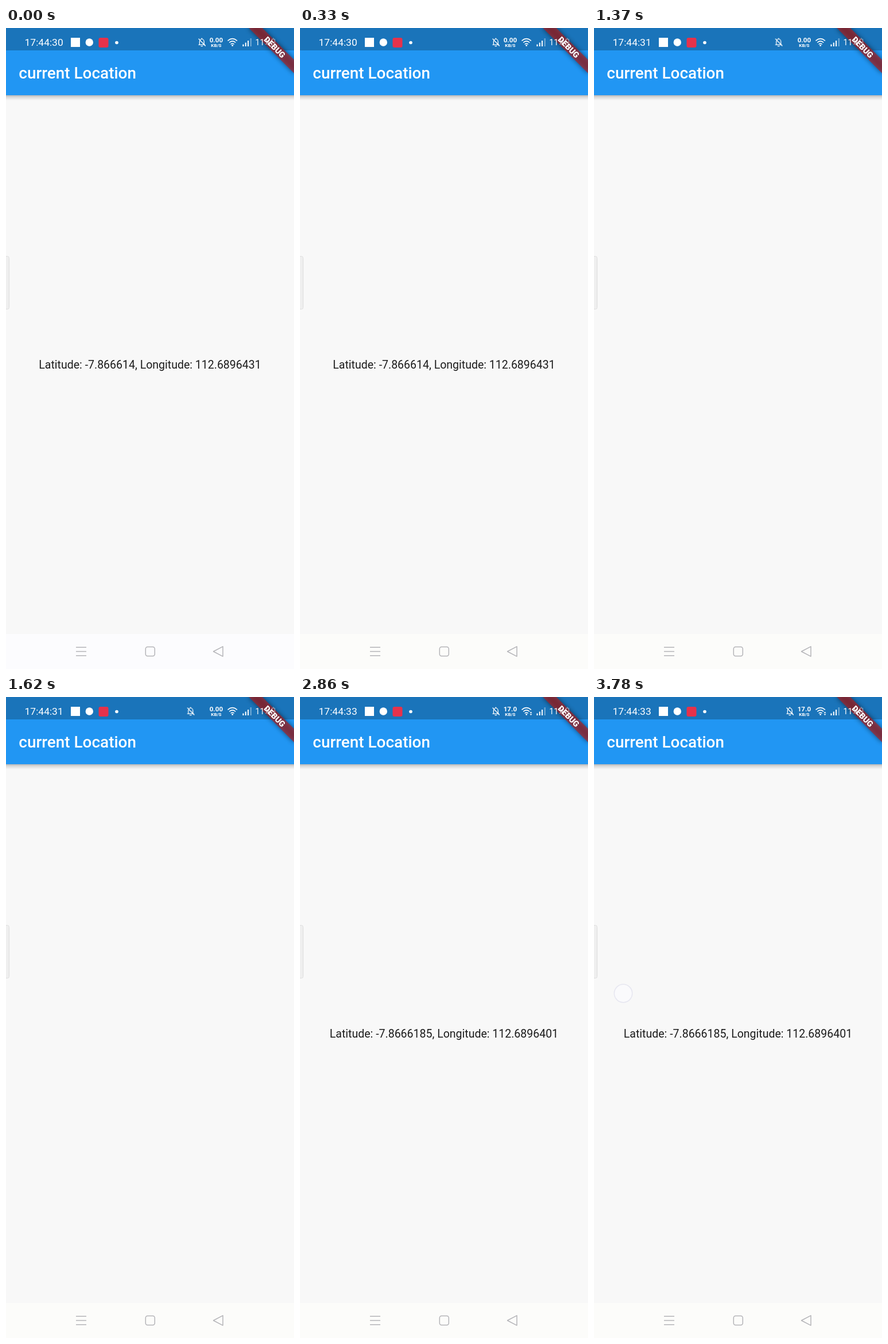
An HTML page that plays this animation: 502 by 1116 pixels, repeating every 3.82 s.

```html
<!DOCTYPE html>
<html lang="en">
<head>
<meta charset="utf-8">
<title>Current location</title>
<style>
  html, body { margin: 0; width: 100%; height: 100%; overflow: hidden; background: #f8f8f8; }
  svg { display: block; width: 502px; height: 1116px; font-family: Roboto, sans-serif; }
  .clock { font-size: 17.4px; }
  .coords { font-size: 19.52px; fill: #1c1c1c; text-anchor: middle; }
  .rate { font-size: 11.6px; font-weight: 700; text-anchor: middle; }

  /* one 3820 ms loop, hard cuts unless noted */
  .cut { opacity: 0; animation: 3820ms step-end infinite; }
  .s0 { animation-name: s0; }
  .s1 { animation-name: s1; }
  .s2 { animation-name: s2; }
  .s3 { animation-name: s3; }
  .fix1 { animation-name: fix1; }
  .fix2 { animation-name: fix2; }
  .idle { animation-name: idle; }
  .busy { animation-name: busy; }
  .cool { animation-name: cool; }
  .touch { animation-name: touch; animation-timing-function: linear; }
  .bell { animation: bell 3820ms ease-in-out infinite; }

  @keyframes s0 { 0% { opacity: 1 } 19.37%, 100% { opacity: 0 } }
  @keyframes s1 { 0% { opacity: 0 } 19.37% { opacity: 1 } 45.5%, 100% { opacity: 0 } }
  @keyframes s2 { 0% { opacity: 0 } 45.5% { opacity: 1 } 72.7%, 100% { opacity: 0 } }
  @keyframes s3 { 0% { opacity: 0 } 72.7%, 100% { opacity: 1 } }
  @keyframes fix1 { 0% { opacity: 1 } 29.3%, 100% { opacity: 0 } }
  @keyframes fix2 { 0% { opacity: 0 } 46.5%, 100% { opacity: 1 } }
  @keyframes idle { 0% { opacity: 1 } 45.5%, 100% { opacity: 0 } }
  @keyframes busy { 0% { opacity: 0 } 45.5%, 100% { opacity: 1 } }
  @keyframes cool { 0% { opacity: 1 } 7.5%, 100% { opacity: 0 } }
  @keyframes touch { 0%, 91.3% { opacity: 0 } 93.4%, 100% { opacity: 1 } }
  @keyframes bell {
    0%, 30.4% { transform: none }
    34.6%, 45.5% { transform: translateX(-19.5px) }
    50%, 100% { transform: none }
  }
</style>
</head>
<body>
<svg viewBox="0 0 502 1116">
  <defs>
    <filter id="soft" x="-30%" y="-150%" width="160%" height="400%"><feGaussianBlur stdDeviation="4"/></filter>
    <linearGradient id="drop" x2="0" y2="1">
      <stop offset="0" stop-opacity=".27"/>
      <stop offset=".35" stop-opacity=".13"/>
      <stop offset="1" stop-opacity="0"/>
    </linearGradient>
  </defs>

  <rect width="502" height="1116" fill="#f8f8f8"/>

  <!-- app bar -->
  <rect y="117" width="502" height="9" fill="url(#drop)"/>
  <rect width="502" height="117" fill="#2196f3"/>
  <rect width="502" height="39" fill="#1a74ba"/>
  <text x="22.3" y="88" font-size="27.9" font-weight="500" fill="#fff">current Location</text>

  <!-- corner banner -->
  <g transform="translate(502 0) rotate(45)">
    <rect x="-55.8" y="39" width="111.5" height="16.7" opacity=".5" filter="url(#soft)"/>
    <rect x="-55.8" y="39" width="111.5" height="16.7" fill="#b71c1c" fill-opacity=".627"/>
    <text y="52.5" font-size="14.2" font-weight="900" fill="#fff" text-anchor="middle">DEBUG</text>
  </g>

  <!-- status bar, above the banner -->
  <g fill="#fff">
    <g class="clock">
      <text class="cut s0" x="32.6" y="31">17:44:30</text>
      <text class="cut s1" x="32.6" y="31">17:44:31</text>
      <text class="cut s2" x="32.6" y="31">17:44:32</text>
      <text class="cut s3" x="32.6" y="31">17:44:33</text>
    </g>
    <rect x="113" y="17" width="16" height="16"/>
    <circle cx="145.3" cy="25" r="6.7"/>
    <rect x="161.5" y="17" width="17" height="17" rx="3" fill="#e6324b"/>
    <circle cx="193" cy="25.5" r="2.8"/>

    <g class="bell" fill="none" stroke="#fff" stroke-width="1.3" stroke-linecap="round" stroke-linejoin="round">
      <path d="M336 29.2h10.6M337.4 28.8v-5a3.9 4.6 0 0 1 7.8 0v5M341.3 18.9v-1M340 31.6h2.6M336 19l11.4 12"/>
    </g>

    <text class="rate cut idle" x="366.4" y="25">0.00</text>
    <text class="rate cut busy" x="366.4" y="25">17.0</text>
    <text x="366.4" y="33.2" font-size="8.1" font-weight="700" text-anchor="middle">KB/S</text>

    <path d="M387 21.8q7.6-6.4 15.4 0M389.7 25q5-4.2 10 0M392.2 28q2.5-2 5 0" fill="none" stroke="#fff" stroke-width="1.6" stroke-linecap="round"/>
    <circle cx="394.7" cy="30.4" r="1.4"/>
    <path class="cut busy" d="M400.5 28l2-2.4 2 2.4zM400.5 29.6h4l-2 2.4z"/>

    <path d="M412.5 28.5h2v3.5h-2zM416.8 25.5h2v6.5h-2zM421.1 22h2v10h-2z"/>
    <path d="M425.6 18h2.4v14h-2.4z" opacity=".35"/>
    <text x="434.6" y="30" font-size="14">11%</text>
    <path d="M463.5 19.5h5v12h-5zM465 18h2" fill="none" stroke="#fff" stroke-opacity=".5" stroke-width="1.2"/>
  </g>

  <!-- edge handle -->
  <path d="M0 397.5h2.5q3 0 3 3v86q0 3-3 3H0" fill="#efefef" stroke="#dedede"/>

  <text class="coords cut fix1" x="251" y="593">Latitude: -7.866614, Longitude: 112.6896431</text>
  <text class="coords cut fix2" x="251" y="593">Latitude: -7.8666185, Longitude: 112.6896401</text>

  <circle class="cut touch" cx="51" cy="516" r="15.7" fill="#fafafc" stroke="#e6e6f0" stroke-width="1.5"/>

  <!-- navigation bar -->
  <rect y="1055" width="502" height="61" fill="#fcfcfa"/>
  <rect class="cut cool" y="1055" width="502" height="61" fill="#fcfcfe"/>
  <g fill="none" stroke="#b4b4b8" stroke-width="1.5" stroke-linejoin="round">
    <path d="M122 1078.3h18M122 1085.5h18M122 1092.7h18"/>
    <rect x="243.3" y="1077.5" width="16" height="16" rx="3.5"/>
    <path d="M361.5 1085.5l16.5-8.6v17.2z"/>
  </g>
</svg>
</body>
</html>
```
